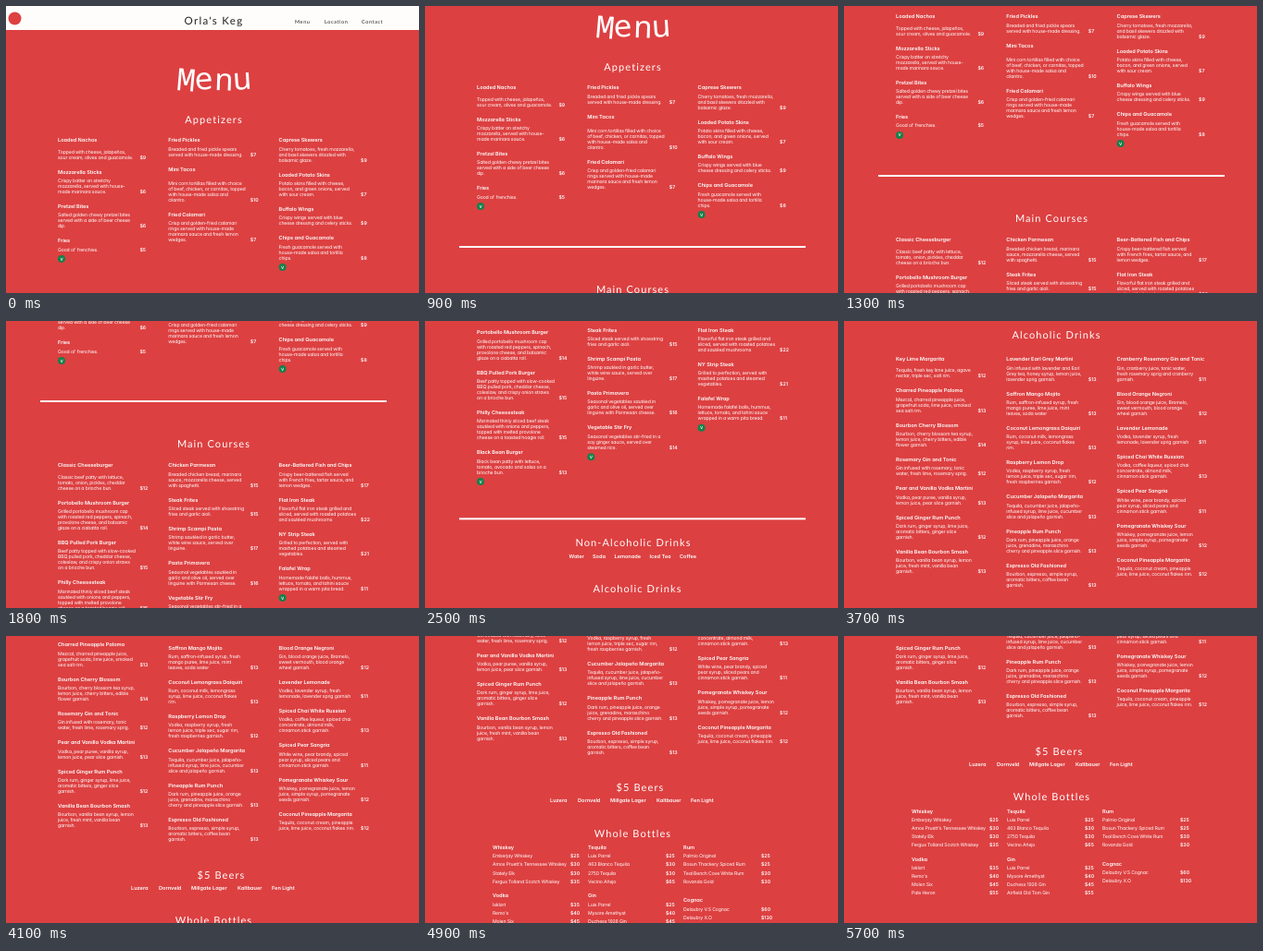
An HTML page that plays this animation: 446 by 311 pixels, repeating every 6500 ms.

```html
<!DOCTYPE html>
<html lang="en">
<head>
<meta charset="utf-8">
<title>Menu</title>
<style>
html, body { margin: 0; width: 100%; height: 100%; overflow: hidden; background: #dd4041; }
svg { display: block; width: 446px; height: 311px; }
text { fill: #fff; font-family: Inter, sans-serif; font-feature-settings: "cv11"; text-rendering: geometricPrecision; white-space: pre; }
.name { font-size: 5.6px; font-weight: 600; letter-spacing: -.02px; }
.body { font-size: 5.2px; font-weight: 400; letter-spacing: -.16px; }
.price { font-size: 5.2px; font-weight: 600; }
.veg { font-size: 4.4px; font-weight: 600; text-anchor: middle; }
.head, .brand, .nav { font-family: Lato, sans-serif; letter-spacing: 1.1px; }
.head, .brand, .big { text-anchor: middle; }
.head { font-size: 11px; }
.brand { font-size: 11.5px; letter-spacing: 1.3px; fill: #222; }
.nav { font-size: 5.5px; letter-spacing: .6px; fill: #222; }
.big { font-family: "Noto Sans Mono", monospace; font-size: 33.5px; font-weight: 300; letter-spacing: .6px; }
</style>
</head>
<body>
<svg viewBox="0 0 446 311"><g id="page"></g></svg>
<script>
const page = document.getElementById('page');

function add(tag, attrs, text) {
  const el = document.createElementNS('http://www.w3.org/2000/svg', tag);
  for (const k in attrs) el.setAttribute(k, attrs[k]);
  if (text) el.textContent = text;
  page.append(el);
  return el;
}
// y is the middle of the capitals
const put = (cls, x, y, text) =>
  add('text', { class: cls, x, y: y + (/head|brand/.test(cls) ? 4 : 1.9) }, text);
const rule = y => add('rect', { x: 37, y: y - 1, width: 374, height: 2, fill: '#fff' });
const row = (y, items) => items.forEach(([x, s]) => put('name', x, y, s));

// Dish: [name, price, lines, extra gap, vegetarian]
function column(x, y, dishes) {
  for (const [name, price, lines, gap = 0, veg] of dishes) {
    put('name', x, y, name);
    y += 9.3 + gap;
    lines.split('/').forEach((s, i) => {
      if (i) y += 6;
      put('body', x, y, s);
    });
    put('price', x + 88.5, y, '$' + price);
    if (veg) {
      add('circle', { cx: x + 4, cy: y + 10.3, r: 4, fill: '#16804a' });
      put('veg', x + 4, y + 10, 'V');
    }
    y += 16;
  }
}
const columns = (y, cols) => cols.forEach((c, i) => column(56 + i * 119.3, y, c));

function bottles(x, y, title, list) {
  put('name', x, y, title);
  list.forEach(([name, price], i) => {
    put('body', x, y + 9.1 * (i + 1), name);
    put('price', x + 84, y + 9.1 * (i + 1), '$' + price);
  });
}

add('rect', { width: 446, height: 26, fill: '#fffdfb' });
add('circle', { cx: 9.5, cy: 13.5, r: 7, fill: '#dd4041' });
put('brand', 224.5, 15.5, "Orla's Keg");
[[312, 'Menu'], [344, 'Location'], [384, 'Contact']].forEach(([x, s]) => put('nav', x, 17, s));
add('text', { class: 'big', x: 225, y: 91, rotate: '5 -4 2 -4' }, 'Menu');

put('head', 224.5, 122.5, 'Appetizers');
columns(145.5, [[
  ['Loaded Nachos', 9, 'Topped with cheese, jalapeños,/sour cream, olives and guacamole.', 2.9],
  ['Mozzarella Sticks', 6, 'Crispy batter on stretchy/mozzarella, served with house-/made marinara sauce.'],
  ['Pretzel Bites', 6, 'Salted golden chewy pretzel bites/served with a side of beer cheese/dip.'],
  ['Fries', 5, "Good ol' frenchies.", 0, 1]
], [
  ['Fried Pickles', 7, 'Breaded and fried pickle spears/served with house-made dressing.'],
  ['Mini Tacos', 10, 'Mini corn tortillas filled with choice/of beef, chicken, or carnitas, topped/with house-made salsa and/cilantro.', 6],
  ['Fried Calamari', 7, 'Crisp and golden-fried calamari/rings served with house-made/marinara sauce and fresh lemon/wedges.']
], [
  ['Caprese Skewers', 9, 'Cherry tomatoes, fresh mozzarella,/and basil skewers drizzled with/balsamic glaze.'],
  ['Loaded Potato Skins', 7, 'Potato skins filled with cheese,/bacon, and green onions, served/with sour cream.'],
  ['Buffalo Wings', 9, 'Crispy wings served with blue/cheese dressing and celery sticks.'],
  ['Chips and Guacamole', 8, 'Fresh guacamole served with/house-made salsa and tortilla/chips.', 0, 1]
]]);

rule(318);
put('head', 224.5, 364, 'Main Courses');
columns(387.5, [[
  ['Classic Cheeseburger', 12, 'Classic beef patty with lettuce,/tomato, onion, pickles, cheddar/cheese on a brioche bun.', 2.9],
  ['Portobello Mushroom Burger', 14, 'Grilled portobello mushroom cap/with roasted red peppers, spinach,/provolone cheese, and balsamic/glaze on a ciabatta roll.'],
  ['BBQ Pulled Pork Burger', 15, 'Beef patty topped with slow-cooked/BBQ pulled pork, cheddar cheese,/coleslaw, and crispy onion straws/on a brioche bun.'],
  ['Philly Cheesesteak', 15, 'Marinated thinly sliced beef steak/sautéed with onions and peppers,/topped with melted provolone/cheese on a toasted hoagie roll.'],
  ['Black Bean Burger', 13, 'Black bean patty with lettuce,/tomato, avocado and salsa on a/brioche bun.', 0, 1]
], [
  ['Chicken Parmesan', 15, 'Breaded chicken breast, marinara/sauce, mozzarella cheese, served/with spaghetti.'],
  ['Steak Frites', 15, 'Sliced steak served with shoestring/fries and garlic aioli.'],
  ['Shrimp Scampi Pasta', 17, 'Shrimp sautéed in garlic butter,/white wine sauce, served over/linguine.'],
  ['Pasta Primavera', 16, 'Seasonal vegetables sautéed in/garlic and olive oil, served over/linguine with Parmesan cheese.'],
  ['Vegetable Stir Fry', 14, 'Seasonal vegetables stir-fried in a/soy ginger sauce, served over/steamed rice.', 0, 1]
], [
  ['Beer-Battered Fish and Chips', 17, 'Crispy beer-battered fish served/with French fries, tartar sauce, and/lemon wedges.'],
  ['Flat Iron Steak', 22, 'Flavorful flat iron steak grilled and/sliced, served with roasted potatoes/and sautéed mushrooms'],
  ['NY Strip Steak', 21, 'Grilled to perfection, served with/mashed potatoes and steamed/vegetables.'],
  ['Falafel Wrap', 11, 'Homemade falafel balls, hummus,/lettuce, tomato, and tahini sauce/wrapped in a warm pita bread.', 0, 1]
]]);

rule(629.5);
put('head', 225, 655, 'Non-Alcoholic Drinks');
row(670.5, [[155.5, 'Water'], [181, 'Soda'], [204.5, 'Lemonade'], [242.5, 'Iced Tea'], [275, 'Coffee']]);
put('head', 229.5, 705, 'Alcoholic Drinks');
columns(731.3, [[
  ['Key Lime Margarita', 12, 'Tequila, fresh key lime juice, agave/nectar, triple sec, salt rim.', 2.9],
  ['Charred Pineapple Paloma', 13, 'Mezcal, charred pineapple juice,/grapefruit soda, lime juice, smoked/sea salt rim.'],
  ['Bourbon Cherry Blossom', 14, 'Bourbon, cherry blossom tea syrup,/lemon juice, cherry bitters, edible/flower garnish.'],
  ['Rosemary Gin and Tonic', 12, 'Gin infused with rosemary, tonic/water, fresh lime, rosemary sprig.'],
  ['Pear and Vanilla Vodka Martini', 13, 'Vodka, pear puree, vanilla syrup,/lemon juice, pear slice garnish.'],
  ['Spiced Ginger Rum Punch', 12, 'Dark rum, ginger syrup, lime juice,/aromatic bitters, ginger slice/garnish.'],
  ['Vanilla Bean Bourbon Smash', 13, 'Bourbon, vanilla bean syrup, lemon/juice, fresh mint, vanilla bean/garnish.']
], [
  ['Lavender Earl Grey Martini', 13, 'Gin infused with lavender and Earl/Grey tea, honey syrup, lemon juice,/lavender sprig garnish.'],
  ['Saffron Mango Mojito', 13, 'Rum, saffron-infused syrup, fresh/mango puree, lime juice, mint/leaves, soda water'],
  ['Coconut Lemongrass Daiquiri', 13, 'Rum, coconut milk, lemongrass/syrup, lime juice, coconut flakes/rim.'],
  ['Raspberry Lemon Drop', 12, 'Vodka, raspberry syrup, fresh/lemon juice, triple sec, sugar rim,/fresh raspberries garnish.'],
  ['Cucumber Jalapeño Margarita', 13, 'Tequila, cucumber juice, jalapeño-/infused syrup, lime juice, cucumber/slice and jalapeño garnish.'],
  ['Pineapple Rum Punch', 13, 'Dark rum, pineapple juice, orange/juice, grenadine, maraschino/cherry and pineapple slice garnish.'],
  ['Espresso Old Fashioned', 13, 'Bourbon, espresso, simple syrup,/aromatic bitters, coffee bean/garnish.']
], [
  ['Cranberry Rosemary Gin and Tonic', 11, 'Gin, cranberry juice, tonic water,/fresh rosemary sprig and cranberry/garnish.'],
  ['Blood Orange Negroni', 12, 'Gin, blood orange juice, Bramelo,/sweet vermouth, blood orange/wheel garnish.'],
  ['Lavender Lemonade', 11, 'Vodka, lavender syrup, fresh/lemonade, lavender sprig garnish'],
  ['Spiced Chai White Russian', 13, 'Vodka, coffee liqueur, spiced chai/concentrate, almond milk,/cinnamon stick garnish.'],
  ['Spiced Pear Sangria', 11, 'White wine, pear brandy, spiced/pear syrup, sliced pears and/cinnamon stick garnish.'],
  ['Pomegranate Whiskey Sour', 12, 'Whiskey, pomegranate juice, lemon/juice, simple syrup, pomegranate/seeds garnish.'],
  ['Coconut Pineapple Margarita', 12, 'Tequila, coconut cream, pineapple/juice, lime juice, coconut flakes rim.']
]]);

put('head', 232.5, 1014.5, '$5 Beers');
row(1029, [[135, 'Luzera'], [165, 'Dornveld'], [200, 'Millgate Lager'], [250, 'Kaltbauer'], [287, 'Fen Light']]);

put('head', 224.5, 1064, 'Whole Bottles');
bottles(73, 1079.8, 'Whiskey', [['Emberjay Whiskey', 25], ["Amos Pruett's Tennessee Whiskey", 30], ['Stately Elk', 30], ['Fergus Tolland Scotch Whiskey', 35]]);
bottles(176, 1079.8, 'Tequila', [['Luis Parrel', 25], ['463 Blanco Tequila', 30], ['2750 Tequila', 30], ['Vecino Añejo', 65]]);
bottles(279, 1079.8, 'Rum', [['Palmio Original', 25], ['Bosun Thackery Spiced Rum', 25], ['Teal Bench Cove White Rum', 30], ['Rovanda Gold', 30]]);
bottles(73, 1132, 'Vodka', [['Isklart', 35], ["Remo's", 40], ['Molen Six', 45], ['Pale Heron', 55]]);
bottles(176, 1132, 'Gin', [['Luis Parrel', 25], ['Mysore Amethyst', 40], ['Duchess 1926 Gin', 45], ['Airfield Old Tom Gin', 55]]);
bottles(279, 1137, 'Cognac', [['Delaubry V.S Cognac', 60], ['Delaubry X.O', 130]]);

// Scroll keys: time, offset, speed in px per ms
const keys = [
  [700, 0, .28], [900, 57, .22], [1800, 231, .23], [3200, 592.3, .21],
  [4100, 756, .15], [4900, 850.5, .085], [5600, 890, .03]
];

function scrollAt(t) {
  if (t <= 700) return 0;
  const i = keys.findIndex(k => k[0] > t);
  if (i < 0) return 890;
  const [t0, y0, v0] = keys[i - 1], [t1, y1, v1] = keys[i];
  const h = t1 - t0, u = (t - t0) / h, w = 1 - u;
  return y0 * w * w * (1 + 2 * u) + y1 * u * u * (3 - 2 * u) + h * u * w * (v0 * w - v1 * u);
}

function draw() {
  const t = Math.floor(performance.now() % 6500 / 100) * 100;
  page.setAttribute('transform', `translate(0 ${-scrollAt(t)})`);
  requestAnimationFrame(draw);
}
draw();
</script>
</body>
</html>
```
